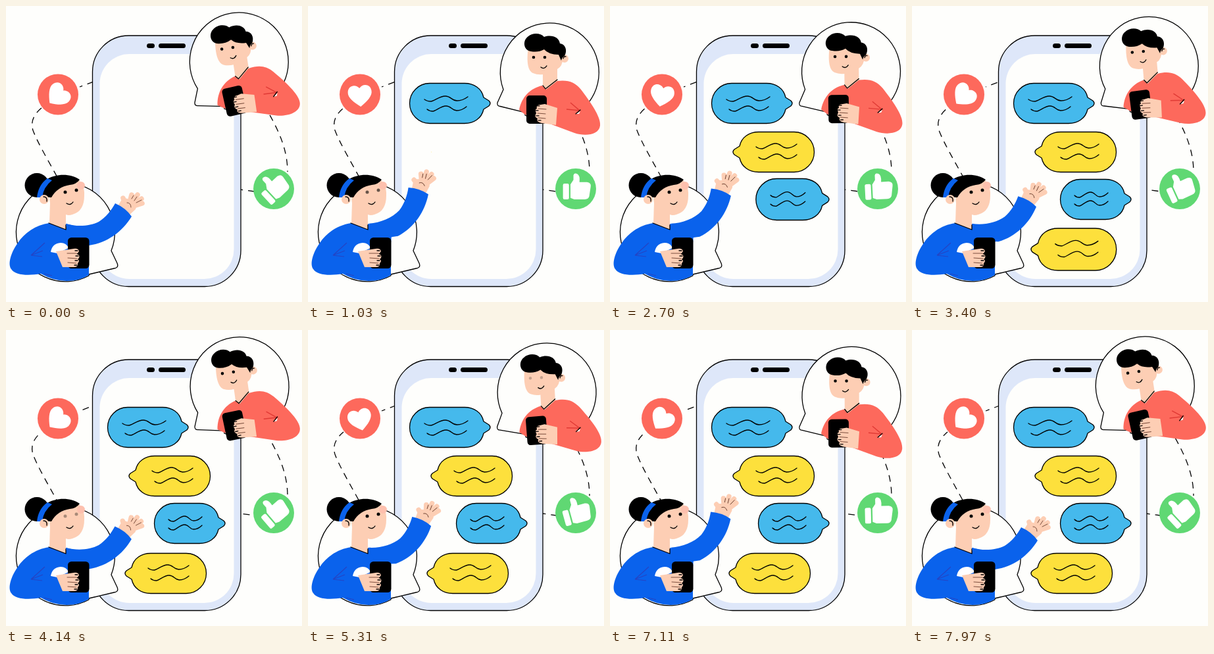
An HTML page that plays this animation: 450 by 450 pixels, repeating every 8 s.

```html
<!DOCTYPE html>
<html lang="en">
<head>
<meta charset="utf-8">
<title>Chatting friends</title>
<style>
  html, body { margin: 0; width: 100%; height: 100%; overflow: hidden; background: #fefefc; }
  svg { display: block; width: 100vw; height: 100vh; }
  .line { fill: none; stroke: #000; stroke-width: 1.3; stroke-linecap: round; stroke-linejoin: round; }
  .paper { fill: #fefefc; stroke: #000; stroke-width: 1.3; stroke-linejoin: round; }
  .dash { fill: none; stroke: #000; stroke-width: 1.3; stroke-dasharray: 10 8; }
  .skin { fill: #fdceb4; }
  .finger { fill: none; stroke: #fdceb4; stroke-width: 7.5; stroke-linecap: round; }
  .crease { fill: none; stroke: #6b4030; stroke-width: .9; stroke-linecap: round; }
  .coral { fill: #fd695c; }
  .blue { fill: #0a62ec; }
  .white { fill: #fff; }
</style>
</head>
<body>
<svg viewBox="0 0 450 450">
  <g id="dashes">
    <path class="dash" d="M133 115L112 123"/>
    <path class="dash" d="M54 155C42 165 37 176 41 189C48 208 66 238 80 264"/>
    <path class="dash" d="M392 150C412 184 428 215 428 252"/>
    <path class="dash" d="M378 282L356 279"/>
  </g>

  <rect x="131.500" y="45" width="225.500" height="381.500" rx="55" fill="#dee7f9" stroke="#000" stroke-width="1.300"/>
  <rect x="142.500" y="73" width="204" height="342" rx="45" fill="#fefefc"/>
  <rect x="214" y="57" width="12" height="7" rx="3.500"/>
  <rect x="232" y="57" width="41" height="7" rx="3.500"/>

  <g id="bubbles"></g>

  <circle class="coral" cx="79" cy="134.500" r="31"/>
  <path id="heart" class="white" d="M0 17C-10 10-19 2-18-6C-17-17-5-18 0-11C5-18 17-17 18-6C19 2 10 10 0 17Z"/>

  <circle cx="407" cy="278" r="31" fill="#60d873"/>
  <g id="thumb" class="white">
    <rect x="-17" y="-7" width="8" height="21" rx="2"/>
    <path d="M-7-6L-3-12V-18Q-2-22 2-20Q6-18 5-9H15Q21-8 20-3L18 10Q17 14 12 14H-2L-7 12Z"/>
  </g>

  <g id="man">
    <path class="paper" d="M297 127L288 147Q287 152 292 152.500L330 162V166A75 75 0 1 0 297 127Z"/>
    <g id="manHead">
      <circle class="skin" cx="390" cy="80" r="6"/>
      <path class="skin" d="M335 63C332 84 334 98 342 102Q349 105 357 104V121L362 127L379 115V96Q387 92 388 78L388 60Z"/>
      <path d="M339 69C327 67 326 52 335 46C342 40 354 41 359 47C371 43 382 48 383 57C391 58 395 67 390 76Q386 78 385 83L381 74Q366 74 359 66Q350 71 339 69Z"/>
      <path class="line" d="M388 80Q389 76 392 77M354 93Q359 97 363 91"/>
      <g id="manEyes"><circle cx="343" cy="78" r="2.300"/><circle cx="360" cy="78" r="2.300"/></g>
    </g>
    <path class="coral" d="M356 121L362 127L379 114C396 112 406 116 415 127C428 144 446 169 444 182C442 197 420 198 405 193L362 177L330 165L321 158C325 138 338 125 356 121Z"/>
    <path class="line" d="M357 121L361 126L379 112"/>
    <path d="M399 147L413 159L393 157" fill="none" stroke="#e03a35" stroke-width="1.400"/>
    <path class="white" d="M407 164L414 160L412 164Z"/>
    <path class="line" d="M407 164L414 158"/>
    <rect x="332" y="136" width="31" height="43" rx="5"/>
    <path class="skin" d="M360 149L379 155L377 181L355 178Q346 176 349 171Q343 168 347 163Q344 157 348 156Q346 150 354 150Z"/>
    <path class="crease" d="M350 156L362 157M349 163L361 164M350 170L361 171"/>
    <path class="line" stroke-width="1" d="M348 152h4M346 159h4M347 167h4M350 174h4"/>
  </g>

  <g id="woman">
    <path class="paper" d="M160 372L169 391Q172 398 164 399L126 408V410A75 75 0 1 1 160 372Z"/>
    <path class="blue" d="M66 330C45 333 28 345 18 360C8 374 2 392 8 400C14 410 35 410 53 407Q72 418 92 418Q112 418 126 409V360L128 340L91 331Z"/>
    <circle cx="47" cy="272.500" r="18.500"/>
    <path class="skin" d="M66 290C70 272 85 262 105 260Q120 270 119 288Q119 312 101 317Q95 319 91 317V340L66 330L67 300Z"/>
    <circle cx="114" cy="273" r="6" fill="#fdc0ae"/>
    <path d="M63 263C76 255 98 254 112 264Q107 271 97 272Q78 275 69 291L52 290Z"/>
    <path class="blue" d="M47 291Q49 272 63 262L70 265Q57 275 55 291Z"/>
    <circle class="skin" cx="58" cy="294" r="7"/>
    <path class="line" d="M57 290Q63 290 62 297M92 300Q98 304 102 298M65 330L91 340V333"/>
    <g id="womanEyes"><circle cx="90" cy="283" r="2.500"/><circle cx="107" cy="280" r="2.500"/></g>
    <g id="arm">
      <g class="finger">
        <path d="M181 308L189 300"/><path d="M182 303L178 292"/><path d="M187 302L191 287"/>
        <path d="M189 302L200 287"/><path d="M190 304L206 293"/><path d="M188 306L207 300"/>
      </g>
      <path class="skin" d="M170 304L178 291L200 298L197 309L185 320Z"/>
      <path class="crease" d="M195 296L199 290M198 299L206 295M191 293L194 288M184 299Q190 299 190 306"/>
      <path class="blue" d="M91 331C108 336 127 335 141 328C152 321 160 311 166 300Q182 307 191 320C177 343 154 360 126 364L96 358Z"/>
    </g>
    <path class="white" d="M68 374Q70 361 83 360Q92 360 95 368L78 376Z"/>
    <path d="M59 360L38 379L56 372M38 379L55 381M58 407L70 410" fill="none" stroke="#2444c4" stroke-width="1.200"/>
    <rect x="94" y="352" width="32.500" height="47" rx="5.500"/>
    <path class="skin" d="M76 373L103 369Q110 368 111 373Q109 376 107 377Q113 378 111 383L109 385Q113 387 109 391Q110 397 103 397L86 397Z"/>
    <path class="crease" d="M93 376L107 376M94 383L108 384M94 390L107 391"/>
    <path class="line" stroke-width="1" d="M105 372h4M106 380h4M105 387h4M104 394h4"/>
  </g>
</svg>

<script>
const LOOP = 8000;
const byId = id => document.getElementById(id);
const place = (id, value) => byId(id).setAttribute('transform', value);
const clamp = v => Math.min(1, Math.max(0, v));
const smooth = u => u * u * (3 - 2 * u);

// Cubic ease (.4, 0, .25, 1)
function ease(x) {
  let low = 0, high = 1;
  for (let i = 0; i < 18; i++) {
    const u = (low + high) / 2, v = 1 - u;
    if (1.2 * u * v * v + .75 * u * u * v + u ** 3 < x) low = u; else high = u;
  }
  return smooth(low);
}

// Goes 0 -> 1 -> 0 over one period
function swing(time, period) {
  const phase = time % period / period * 2;
  return phase < 1 ? ease(phase) : 1 - ease(phase - 1);
}

// Trough, crest, trough, then a rising end
function wave(x, y, w) {
  const points = [[.04, 2], [.09, 3], [.15, 3], [.2, -8], [.33, -8], [.15, 7], [.27, 7], [.19, -3], [.25, -6]]
    .map(([dx, dy]) => `${dx * w} ${dy}`);
  return `M${x} ${y}c${points.slice(0, 3)}s${points.slice(3)}`;
}

// Position of the tail tip, total width, tail side, colour, waves relative to the tip
const SKY = '#45b9ec', YELLOW = '#fde03c';
const bubbles = [
  { x: 277, y: 148, w: 122, side: 1, fill: SKY, waves: [[-100, -6, 66], [-96, 9, 60]] },
  { x: 187, y: 222, w: 123, side: -1, fill: YELLOW, waves: [[35, -8, 62], [39, 8, 58]] },
  { x: 333, y: 294, w: 107, side: 1, fill: SKY, waves: [[-86, -6, 51], [-86, 7, 51]] },
  { x: 181, y: 370, w: 123, side: -1, fill: YELLOW, waves: [[35, -8, 62], [39, 8, 58]] }
];

byId('bubbles').innerHTML = bubbles.map(({ w, side, fill, waves }, i) => `
  <g id="bubble${i}">
    <path class="line" style="fill:${fill}" transform="scale(${side} 1)"
      d="M-39-30.500C-25-30.500-13-23-10-9L-2-4Q2 0-2 4L-10 9C-13 23-25 30.500-39 30.500H${30 - w}A30.500 30.500 0 0 1 ${30 - w}-30.500Z"/>
    <path class="line" d="${waves.map(args => wave(...args)).join('')}"/>
  </g>`).join('');

function popScale(age) {
  const peak = 1.08;
  if (age <= 0) return 0;
  return age < 500 ? peak * ease(age / 500) : peak - (peak - 1) * ease(clamp(age / 500 - 1));
}

function blink(id, time, moments) {
  const closed = Math.max(...moments.map(at => clamp(1 - Math.abs(time - at) / 70)));
  byId(id).setAttribute('opacity', 1 - .8 * closed);
}

function draw(time) {
  const sway = swing(time, 2000), lean = 1 - sway;
  place('man', `rotate(${-12.6 * lean} 288 152)`);
  place('manHead', `rotate(${4 * lean} 368 120)`);
  place('arm', `rotate(${-20 * sway} 91 326)`);
  place('thumb', `translate(407 278) rotate(${-43 * lean}) scale(1.14)`);
  place('heart', `translate(79 136) rotate(${48 - 68 * swing(time, 4000)})`);
  bubbles.forEach(({ x, y }, i) =>
    place(`bubble${i}`, `translate(${x} ${y}) scale(${popScale(time - 1000 * i)})`));
  blink('womanEyes', time, [1065, 4130]);
  blink('manEyes', time, [5310]);
  byId('dashes').setAttribute('stroke-dashoffset', -24 * 18 * time / LOOP);
}

const start = performance.now();
function tick() {
  draw((performance.now() - start) % LOOP);
  requestAnimationFrame(tick);
}
tick();
</script>
</body>
</html>
```
